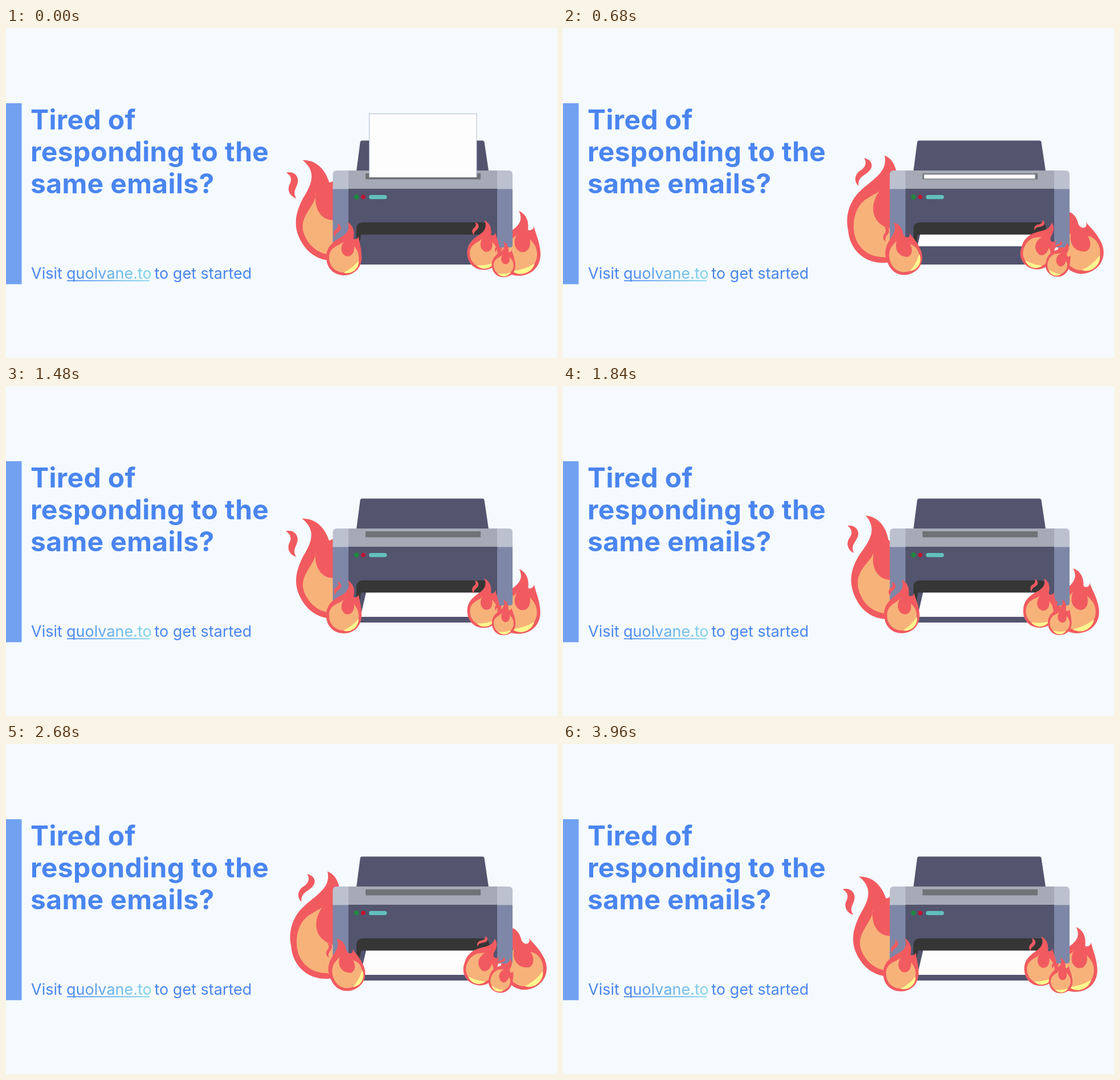
An HTML page that plays this animation: 967x579 px, repeating every 4000 ms.

```html
<!DOCTYPE html>
<html lang="en">
<head>
<meta charset="utf-8">
<title>Printer on fire</title>
<style>
  html, body { margin: 0; width: 100%; height: 100%; overflow: hidden; background: #f4fafe; }
  svg { display: block; width: 100%; height: 100%; }
  text { font-family: Inter, "Open Sans", sans-serif; fill: #4a85f0; }
  .head { font-size: 48px; font-weight: 700; letter-spacing: 0.35px; }
  .note { font-size: 27px; }
</style>
</head>
<body>
<svg viewBox="0 0 967 579">
  <defs>
    <linearGradient id="fade" gradientUnits="userSpaceOnUse" x1="107" y1="0" x2="252" y2="0">
      <stop offset="0" stop-color="#4a85f0"/>
      <stop offset="1" stop-color="#86d6e6"/>
    </linearGradient>
    <clipPath id="inClip"><rect id="inClipBox" x="600" y="140" width="260" height="122"/></clipPath>
    <clipPath id="outClip"><rect x="600" y="362.5" width="260" height="60"/></clipPath>
    <g id="flame"></g>
    <path id="glow" fill="#fdf88e" d="M-17 20Q0 24 17 20C9 32 -9 32 -17 20Z"/>
  </defs>

  <rect width="967" height="579" fill="#f4fafe"/>
  <rect y="132" width="27.5" height="317.5" fill="#72a1f2"/>
  <g class="head">
    <text x="43" y="178">Tired of</text>
    <text x="43" y="234">responding to the</text>
    <text x="43" y="290">same emails?</text>
  </g>
  <g class="note">
    <text x="44" y="440">Visit</text>
    <text x="106" y="440" style="fill:url(#fade)">quolvane.to</text>
    <text x="260.5" y="440">to get started</text>
  </g>
  <rect x="107" y="442.5" width="145" height="1.8" fill="url(#fade)"/>

  <g id="back"></g>

  <path fill="#53546e" d="M615 251L621.6 200.5Q622 197.5 625 197.5H836Q839 197.5 839.5 200.5L847 251Z"/>
  <path fill="#7e87a8" d="M573.5 282H889V381Q889 385 885 385H577Q573.5 385 573.5 381Z"/>
  <path fill="#bcc1d0" d="M573.5 282.5V257Q573.5 250 580.5 250H882Q889 250 889 257V282.5Z"/>
  <rect x="601" y="250" width="261" height="32.5" fill="#a5aab6"/>
  <rect x="601" y="282" width="261" height="103" fill="#53546e"/>
  <rect x="631" y="255" width="202" height="10.5" fill="#6f7377"/>
  <circle cx="615" cy="296.5" r="4.2" fill="#1f8a3e"/>
  <circle cx="627" cy="296.5" r="3.8" fill="#c4122f"/>
  <rect x="637" y="293" width="31.5" height="7.3" rx="3.6" fill="#62c0bd"/>
  <path fill="#363636" d="M615 385V353Q615 341 627 341H836Q848 341 848 353V385Z"/>
  <path fill="#53546e" d="M623 362.5H840L848 415H614Z"/>
  <g clip-path="url(#inClip)">
    <rect id="inPaper" y="150.5" height="130" fill="#fdfdfd" stroke="#b4b9cf" stroke-width="1"/>
  </g>
  <g clip-path="url(#outClip)">
    <path id="outPaper" fill="#fdfdfd" d="M632 362H830L839 405H622Z"/>
  </g>

  <g id="front"></g>
</svg>

<script>
const LOOP = 4000, SWAY = 500, STEP = 40;
const $ = id => document.getElementById(id);
const clamp = v => Math.min(1, Math.max(0, v));
const mix = (a, b, u) => a + (b - a) * u;
const ease = v => (1 - Math.cos(Math.PI * clamp(v))) / 2;

// Each part bends from one outline to the other
const parts = [
  { fill: "#f15b60",
    from: "M7 -62C17 -56 20 -46 17 -33C21 -31 26 -34 26 -38C27 -26 31 -18 31 -1C31 18 18 31 0 31C-18 31 -31 18 -31 0C-31 -18 -21 -26 -10 -33C2 -39 13 -46 7 -62Z",
    to: "M6 -63C14 -59 17 -49 14 -38C14 -27 25 -27 25 -36C27 -24 31 -18 31 -1C31 18 18 31 0 31C-18 31 -31 18 -31 0C-33 -14 -27 -27 -16 -35C-4 -44 8 -49 6 -63Z" },
  { fill: "#f15b60",
    from: "M-11 -60C-4 -58 -3 -51 -7 -47C-11 -43 -15 -43 -15 -36C-20 -42 -17 -48 -13 -50C-9 -53 -9 -56 -11 -60Z",
    to: "M-12 -62C-5 -60 -4 -54 -9 -50C-14 -46 -19 -46 -19 -38C-24 -44 -20 -50 -15 -52C-11 -55 -10 -58 -12 -62Z" },
  { fill: "#f7b27a",
    from: "M2 -31C-7 -20 -6 -8 3 -3C12 0 19 -8 18 -20C23 -13 26 -8 26 0C26 15 14 26 0 26C-15 26 -26 15 -26 0C-26 -14 -18 -18 -10 -22C-4 -25 0 -27 2 -31Z",
    to: "M-1 -32C-10 -22 -12 -5 6 2C14 2 19 -6 18 -17C23 -12 26 -8 26 0C26 15 14 26 0 26C-15 26 -26 15 -26 0C-26 -14 -19 -24 -11 -27C-6 -30 -4 -30 -1 -32Z" }
];

// from / to: [x, y, angle]
const flames = [
  { layer: "back", size: 2, glow: -38, from: [573, 345, -32], to: [562, 350, -4] },
  { layer: "back", size: 1.22, glow: -12, from: [900, 397, -6], to: [911, 393, -28] },
  { layer: "front", size: 1, glow: -38, from: [593, 403, 0], to: [599.5, 402, -24] },
  { layer: "front", size: 0.93, glow: -4, from: [838.5, 395.5, -6], to: [831.5, 394.5, 21] },
  { layer: "front", size: 0.67, glow: 2, from: [873.5, 416.5, -8], to: [867.5, 415.5, 19] }
];

function add(parent, tag, attrs) {
  const el = document.createElementNS("http://www.w3.org/2000/svg", tag);
  for (const k in attrs) el.setAttribute(k, attrs[k]);
  return parent.appendChild(el);
}

function morph(a, b, u) {
  const ends = b.match(/-?\d+/g);
  let i = 0;
  return a.replace(/-?\d+/g, n => mix(+n, +ends[i++], u).toFixed(2));
}

for (const p of parts) p.el = add($("flame"), "path", { fill: p.fill });
for (const f of flames) {
  f.el = add($(f.layer), "g", {});
  add(f.el, "use", { href: "#flame" });
  add(f.el, "use", { href: "#glow", transform: `rotate(${f.glow})` });
}

// Quick swing one way, short rest, quick swing back
function sway(t) {
  const p = (t / SWAY + 0.05) % 1;
  return p < 0.48 ? ease(p / 0.45) : 1 - ease((p - 0.51) / 0.34);
}

function draw(t) {
  const u = sway(t);
  for (const p of parts) p.el.setAttribute("d", morph(p.from, p.to, u));
  for (const f of flames) {
    const [x, y, a] = f.from.map((v, i) => mix(v, f.to[i], u));
    f.el.setAttribute("transform", `translate(${x} ${y}) rotate(${a}) scale(${f.size})`);
  }

  const feed = clamp(t / 740);
  const left = mix(637.5, 633.5, feed);
  const inPaper = $("inPaper");
  inPaper.setAttribute("x", left);
  inPaper.setAttribute("width", mix(826, 828.5, feed) - left);
  inPaper.setAttribute("y", 150.5 + feed * 116);
  $("inClipBox").setAttribute("height", mix(122, 124.5, feed));
  inPaper.style.display = feed < 1 ? "" : "none";

  const out = clamp((t - 546) / 274);
  $("outPaper").setAttribute("transform", `translate(0 ${(out - 1) * 43})`);
}

function tick() {
  draw(Math.floor((performance.now() % LOOP) / STEP) * STEP);
  requestAnimationFrame(tick);
}
tick();
</script>
</body>
</html>
```
